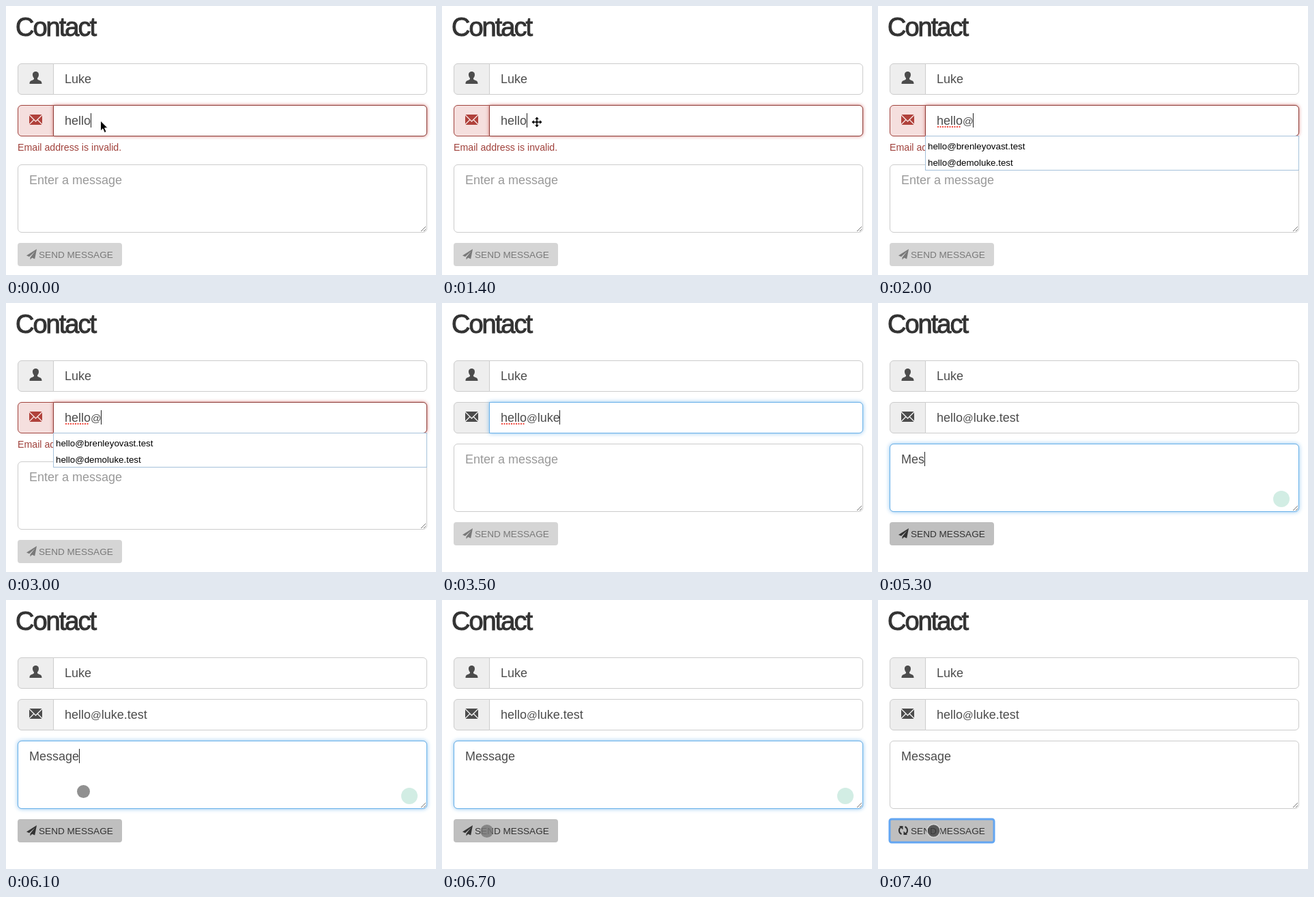
Write an HTML page that moves like this. It is 630 px wide and 394 px high and loops after 7500 ms.

```html
<!DOCTYPE html>
<html lang="en">
<head>
<meta charset="utf-8">
<title>Contact form</title>
<style>
  html, body { margin: 0; width: 100%; height: 100%; overflow: hidden; background: #fff; }
  svg { display: block; width: 630px; height: 394px; font: 18px "Liberation Sans", Arial, sans-serif; }
  text { white-space: pre; fill: #4c4c4c; }
  h1, .title { font-size: 38px; letter-spacing: -2px; fill: #333; stroke: #333; }
  .box { fill: #fff; stroke: #ccc; }
  .addon { fill: #eee; stroke: #ccc; }
  .focus { fill: #fff; stroke: #66afe9; filter: drop-shadow(0 0 3px rgba(102, 175, 233, .75)); }
  .bad { fill: #fff; stroke: #8c3a35; filter: drop-shadow(0 0 2.5px rgba(206, 100, 98, .85)); }
  .hint { font-size: 14.2px; fill: #a0423c; }
  .option { font-size: 13.33px; fill: #000; }
  .label { font-size: 13.6px; fill: #333; }
  .caret { stroke: #222; }
</style>
</head>
<body>
<svg viewBox="0 0 630 394">
  <defs>
    <path id="input" d="M69.500 145.500H611a5.500 5.500 0 0 1 5.500 5.500V185a5.500 5.500 0 0 1-5.500 5.500H69.500z"/>
    <path id="addon" d="M69.500 145.500H23a5.500 5.500 0 0 0-5.500 5.500V185a5.500 5.500 0 0 0 5.500 5.500H69.500z"/>
    <rect id="area" x="17.500" y="206.500" width="599" height="99" rx="5.500"/>
  </defs>

  <text class="title" x="14" y="44">Contact</text>

  <use href="#addon" class="addon" y="-61"/>
  <use href="#input" class="box" y="-61"/>
  <path fill="#4c4c4c" d="M43.500 96c3.300 0 4.700 2.500 4.500 5.200-.2 2.300-1.300 3.500-2 4.600-.3 1.600.4 2 2 2.700 3 1.200 4.500 1.800 4.500 5.500H34.500c0-3.700 1.500-4.300 4.500-5.500 1.600-.7 2.300-1.100 2-2.700-.7-1.100-1.800-2.300-2-4.600-.2-2.700 1.200-5.200 4.500-5.200z"/>
  <text x="86" y="113">Luke</text>

  <use id="mailAddon" href="#addon" class="addon"/>
  <use href="#input" class="box"/>
  <use id="mailFocus" href="#input" class="focus"/>
  <use id="mailBad" href="#input" class="bad"/>
  <g id="mailIcon">
    <path d="M34.500 159h18L43.500 168z"/>
    <path d="M34 160.500l6 5.900-6 6.100zM53 160.500l-6 5.900 6 6.100z"/>
    <path d="M34.500 174l6.500-6.600 2.500 2.500 2.500-2.500 6.500 6.600z"/>
  </g>
  <path id="spell" d="M87 177H121" stroke="#f0483e" stroke-width="2" stroke-dasharray="2 1.500"/>
  <text id="mail" x="86" y="174"></text>
  <text id="hint" class="hint" x="17" y="212">Email address is invalid.</text>

  <g id="lower">
    <use href="#area" class="box"/>
    <use id="areaFocus" href="#area" class="focus"/>
    <path d="M608 304l7-7M612 304l3-3" stroke="#777"/>
    <text id="message" x="34" y="235"></text>
    <circle id="badge" cx="591" cy="287" r="12" fill="#1fa576"/>
    <g id="button">
      <rect x="17" y="321" width="153" height="34" rx="4" fill="#bfbfbf"/>
      <path id="plane" fill="#333" d="M45 330L30 339.500l4 1.700 8.500-7.700-7 8.700V345.500l2.700-2.700 4 1.700z"/>
      <g id="spinner">
        <g id="arc">
          <path d="M-2.500 5.500A6 6 0 0 1-3-5.200" fill="none" stroke="#333" stroke-width="2"/>
          <path d="M-6-6.500H-.500V-1z" fill="#333"/>
        </g>
        <use href="#arc" transform="rotate(180)"/>
      </g>
      <text class="label" x="48" y="343">SEND MESSAGE</text>
    </g>
    <rect id="ring" x="17" y="321" width="153" height="34" rx="3" fill="none" stroke="#63a6f2" stroke-width="3"/>
  </g>

  <g id="popup">
    <rect x="69.500" y="190.500" width="547" height="50" fill="#fff" stroke="#a5c1da"/>
    <text class="option" x="73" y="210">hello@brenleyovast.test</text>
    <text class="option" x="73" y="234">hello@demoluke.test</text>
  </g>

  <path id="caret" class="caret"/>
  <path id="arrow" d="M138.500 168v15l3.400-3.200 2.500 5.700 2.700-1.200-2.500-5.500h4.600z" stroke="#fff"/>
  <path id="move" stroke="#fff" stroke-width=".8" d="M139 162l3.500 4h-2.300v2.800h2.800v-2.300l4 3.500-4 3.500v-2.300h-2.800v2.800h2.300l-3.500 4-3.500-4h2.300v-2.800h-2.800v2.300l-4-3.500 4-3.500v2.300h2.800v-2.800h-2.300z"/>
  <circle id="pointer"/>
</svg>

<script>
const LOOP = 7500, STEP = 100;
const el = {};
document.querySelectorAll('svg [id]').forEach(n => el[n.id] = n);

const clamp = v => Math.max(0, Math.min(1, v));
const fade = (t, start) => clamp((t - start) / 150);
const show = (node, on) => node.style.display = on ? '' : 'none';
const attrs = (node, map) => { for (const k in map) node.setAttribute(k, map[k]); };

// Key press times for each field
const mailKeys = [2000, 3200, 3300, 3400, 3500, 3800, 3900, 4000, 4100, 4200];
const textKeys = [5000, 5100, 5200, 5500, 5600, 5700, 5800];
const path = [[5900, 165, 171], [6000, 145, 220], [6100, 113.5, 280.5], [6200, 90, 331],
  [6300, 62, 337], [6400, 50, 339], [6600, 50, 339], [6800, 81.5, 338]];

const VALID = 3200, TAB = 4400, CLICK = 6800;
const pressed = (keys, t) => keys.filter(k => k <= t);

function along(points, t) {
  const i = points.findIndex(p => p[0] > t);
  if (i < 0) return points[points.length - 1].slice(1);
  if (i === 0) return points[0].slice(1);
  const [a, b] = [points[i - 1], points[i]];
  const f = (t - a[0]) / (b[0] - a[0]);
  return [1, 2].map(k => a[k] + (b[k] - a[k]) * f);
}

function drawMail(t) {
  const count = pressed(mailKeys, t).length;
  const value = 'hello' + '@luke.test'.slice(0, count);
  el.mail.innerHTML = value.replace('@', '<tspan font-size="15.500">@</tspan>');
  const bad = t < VALID;
  attrs(el.mailAddon, { style: bad ? 'fill:#f5dfde;stroke:#a0423c' : '' });
  attrs(el.mailIcon, { fill: bad ? '#b0413b' : '#4c4c4c' });
  attrs(el.mailBad, { opacity: 1 - fade(t, VALID) });
  attrs(el.mailFocus, { opacity: bad ? 0 : 1 - fade(t, TAB) });
  show(el.hint, bad);
  show(el.spell, t >= mailKeys[0] && t < TAB);
  show(el.popup, t >= mailKeys[0] && bad);
  attrs(el.lower, { transform: `translate(0 ${bad ? 26 : 0})` });
}

function drawMessage(t) {
  const count = pressed(textKeys, t).length;
  el.message.textContent = count ? 'Message'.slice(0, count) : 'Enter a message';
  el.message.style.fill = count ? '' : '#999';
  attrs(el.areaFocus, { opacity: fade(t, TAB) * (1 - fade(t, CLICK)) });
  show(el.badge, t >= 4600 && t < CLICK);
  attrs(el.badge, { opacity: 1 - .8 * fade(t, textKeys[0]) });
  attrs(el.button, { opacity: count ? 1 : .65 });
  show(el.ring, t >= CLICK);
  show(el.plane, t < CLICK + 100);
  show(el.spinner, t >= CLICK + 100);
  attrs(el.spinner, { transform: `translate(37 337.500) rotate(${(t - 7400) * .36})` });
}

function drawCaret(t) {
  const inMail = t < TAB;
  const last = pressed([0, ...mailKeys, TAB, ...textKeys], t).pop();
  const typed = inMail ? el.mail : el.message;
  const empty = !inMail && t < textKeys[0];
  const x = (inMail ? 86 : 34) + (empty ? 0 : typed.getComputedTextLength());
  attrs(el.caret, { d: `M${Math.floor(x) + .5} ${inMail ? 157 : 218}v21` });
  // Each key press restarts the blink
  show(el.caret, t < CLICK && Math.floor((t - last) / 500) % 2 === 0);
}

function drawPointer(t) {
  show(el.arrow, t < 1400);
  show(el.move, t >= 1400 && t < mailKeys[0]);
  show(el.pointer, t >= path[0][0]);
  const [cx, cy] = along(path, t);
  const down = t >= CLICK;
  attrs(el.pointer, {
    cx, cy, r: 9.5,
    fill: down ? 'rgba(60,60,60,.78)' : 'rgba(120,120,120,.82)',
    stroke: down ? 'rgba(225,225,225,.85)' : 'none',
    'stroke-width': 1.6
  });
}

function draw(t) {
  drawMail(t);
  drawMessage(t);
  drawCaret(t);
  drawPointer(t);
}

const begin = performance.now();
function tick() {
  const t = (performance.now() - begin) % LOOP;
  draw(Math.floor(t / STEP) * STEP);
  requestAnimationFrame(tick);
}
tick();
</script>
</body>
</html>
```
